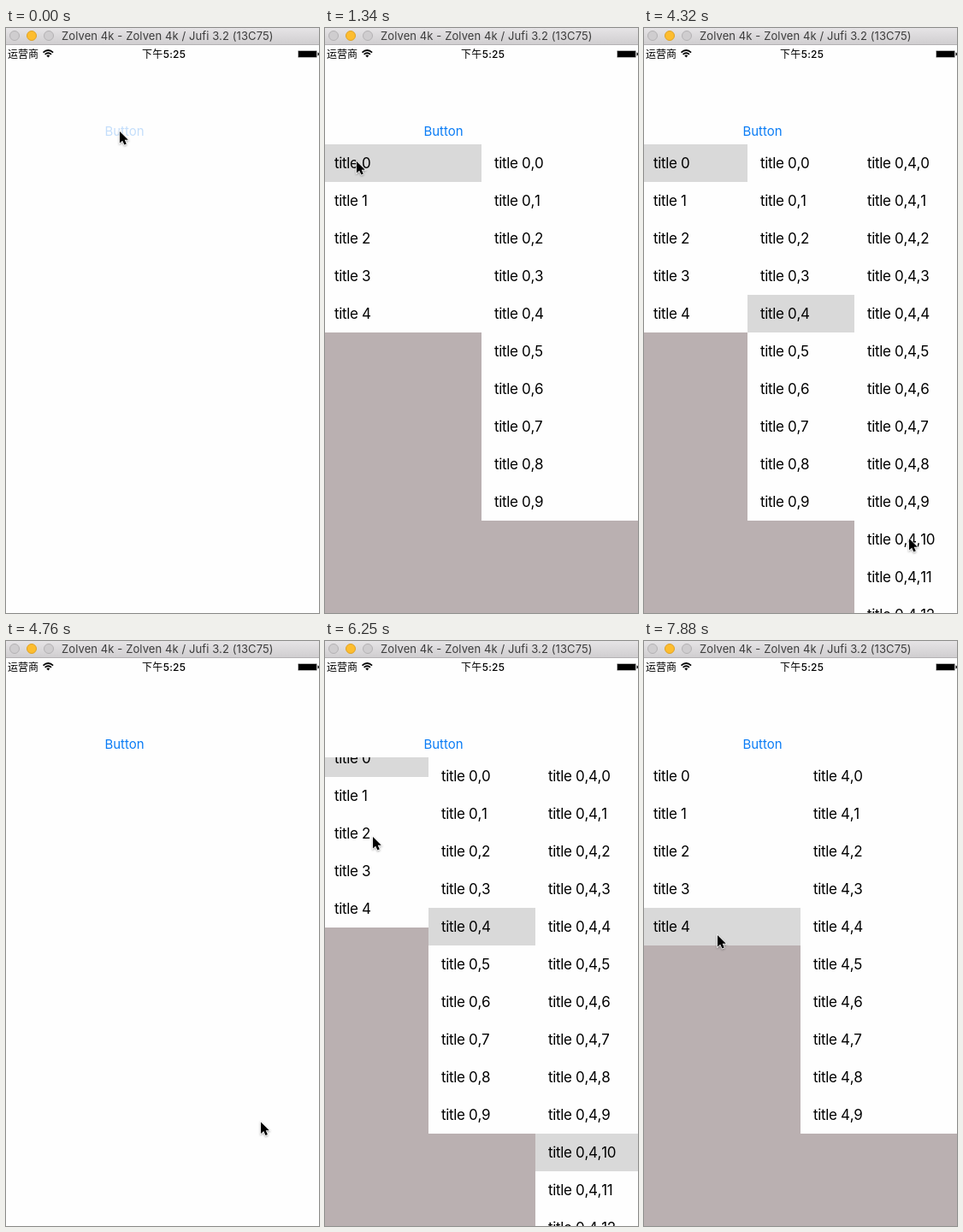
Recreate the animation shown at these times as an HTML page. Size 366 by 684 pixels, loop 8000 ms.

```html
<!DOCTYPE html>
<html lang="zh">
<head>
<meta charset="utf-8">
<style>
  html, body { margin: 0; height: 100%; overflow: hidden; background: #fefefe; }
  #stage { display: block; font-family: Inter, "Noto Sans CJK SC", "Noto Sans CJK", sans-serif; }
  #menu text { font-size: 17px; letter-spacing: -.34px; font-kerning: none; }
  #cursor { filter: drop-shadow(0 1px 1px rgba(0, 0, 0, .35)); }
</style>
</head>
<body>
<svg id="stage" width="366" height="684">
  <defs>
    <linearGradient id="bar" x2="0" y2="1">
      <stop stop-color="#e6e4e6"/><stop offset="1" stop-color="#d0ced0"/>
    </linearGradient>
  </defs>
  <rect width="366" height="684" fill="#fefefe"/>

  <!-- window title bar -->
  <rect width="366" height="19" fill="url(#bar)"/>
  <rect y="19" width="366" height="1" fill="#b3b1b3"/>
  <g fill="#cfcdcf" stroke="#b4b2b4">
    <circle cx="10" cy="9" r="5.5"/>
    <circle cx="30" cy="9" r="5.5" fill="#fdbd2f" stroke="#dfa226"/>
    <circle cx="50" cy="9" r="5.5"/>
  </g>
  <text x="65" y="14" font-size="13" letter-spacing=".1" fill="#3c3c3c">Zolven 4k - Zolven 4k / Jufi 3.2 (13C75)</text>

  <!-- status bar -->
  <text x="2" y="34.5" font-size="12">运营商</text>
  <g fill="none" stroke="#000" stroke-width="1.7">
    <path d="M43.5 28.6Q49.3 23.4 55.1 28.6M45.6 30.9Q49.3 27.6 53 30.9"/>
    <path d="M47.3 32.2Q49.3 30.6 51.3 32.2L49.3 34.4Z" fill="#000" stroke="none"/>
  </g>
  <text x="184.7" y="34.5" font-size="12" font-weight="500" letter-spacing=".3" text-anchor="middle">下午5:25</text>
  <rect x="341.5" y="26.5" width="22" height="8" rx="1" stroke="#b8b8b8"/>
  <path d="M364.5 28.5q1.5 0 1.5 2t-1.5 2z"/>

  <text id="button" x="138.5" y="126" font-size="15" text-anchor="middle">Button</text>
  <g id="menu"></g>
  <path id="cursor" d="M0 0V13.6L3.2 10.7L5.4 15.6L7.8 14.6L5.7 9.8H9.8Z" stroke="#fff" stroke-width="1.4" paint-order="stroke"/>
</svg>
<script>
const LOOP = 8000, STEP = 148.5, ROW = 44, TOP = 136, HEIGHT = 548;
const $ = id => document.getElementById(id);
const rect = (y, w, h, fill) => `<rect y="${y}" width="${w}" height="${h}" fill="${fill}"/>`;

// Pointer glides: first step, last step, destination
const glides = [
  [0, 7, 37, 156], [9, 17, 249, 257], [17, 18, 253, 329], [20, 26, 300, 525],
  [27, 29, 310, 597], [31, 37, 149, 130], [38, 42, 56, 229], [45, 50, 86, 344]
];

function pointer(s) {
  let x = 133, y = 121;
  for (const [from, to, tx, ty] of glides) {
    const u = Math.max(0, Math.min(1, (s - from) / (to - from)));
    const ease = u * u * (3 - 2 * u);
    x += (tx - x) * ease;
    y += (ty - y) * ease;
  }
  return [x, y];
}

// Rows chosen so far, one per column; null while the menu is closed
function chosen(s) {
  if (s < 1 || s >= 31 && s < 39) return null;
  if (s < 9) return [];
  if (s < 20) return [0];
  if (s < 31) return [0, 4];
  return s < 51 ? [0, 4, 10] : [4];
}

// Rubber-band drag of the first column
const dragAt = s => s > 40 && s < 46 ? Math.round(24 * Math.sin((s - 40) / 6 * Math.PI)) : 0;

function column(pick, level, count, scroll) {
  const edge = n => Math.floor(n * 375 / count - 4);
  const x = edge(level), width = edge(level + 1) - x;
  const rows = [5, 10, 13][level];
  let out = `<svg x="${x}" y="${TOP}" width="${width}" height="${HEIGHT}">` +
    rect(-scroll, width, rows * ROW, '#fefefe');
  for (let r = 0; r < rows; r++) {
    const y = r * ROW - scroll;
    const label = [...pick.slice(0, level), r].join(',');
    if (pick[level] === r) out += rect(y, width, ROW, '#d9d9d9');
    out += `<text x="15" y="${y + 28}">title ${label}</text>`;
  }
  return out + '</svg>';
}

function menu(pick, scroll) {
  if (!pick) return '';
  const count = Math.min(pick.length + 1, 3);
  let out = rect(TOP, 366, HEIGHT, '#bab0b1');
  for (let i = 0; i < count; i++) out += column(pick, i, count, i ? 0 : scroll);
  return out;
}

let last = -1;
function frame(now) {
  const s = Math.floor(now % LOOP / STEP);
  if (s !== last) {
    last = s;
    $('menu').innerHTML = menu(chosen(s), dragAt(s));
    $('cursor').setAttribute('transform', `translate(${pointer(s)})`);
    $('button').setAttribute('fill', s === 0 || s === 38 ? '#c4defb' : '#0a7cf5');
  }
  requestAnimationFrame(frame);
}
frame(0);
</script>
</body>
</html>
```
